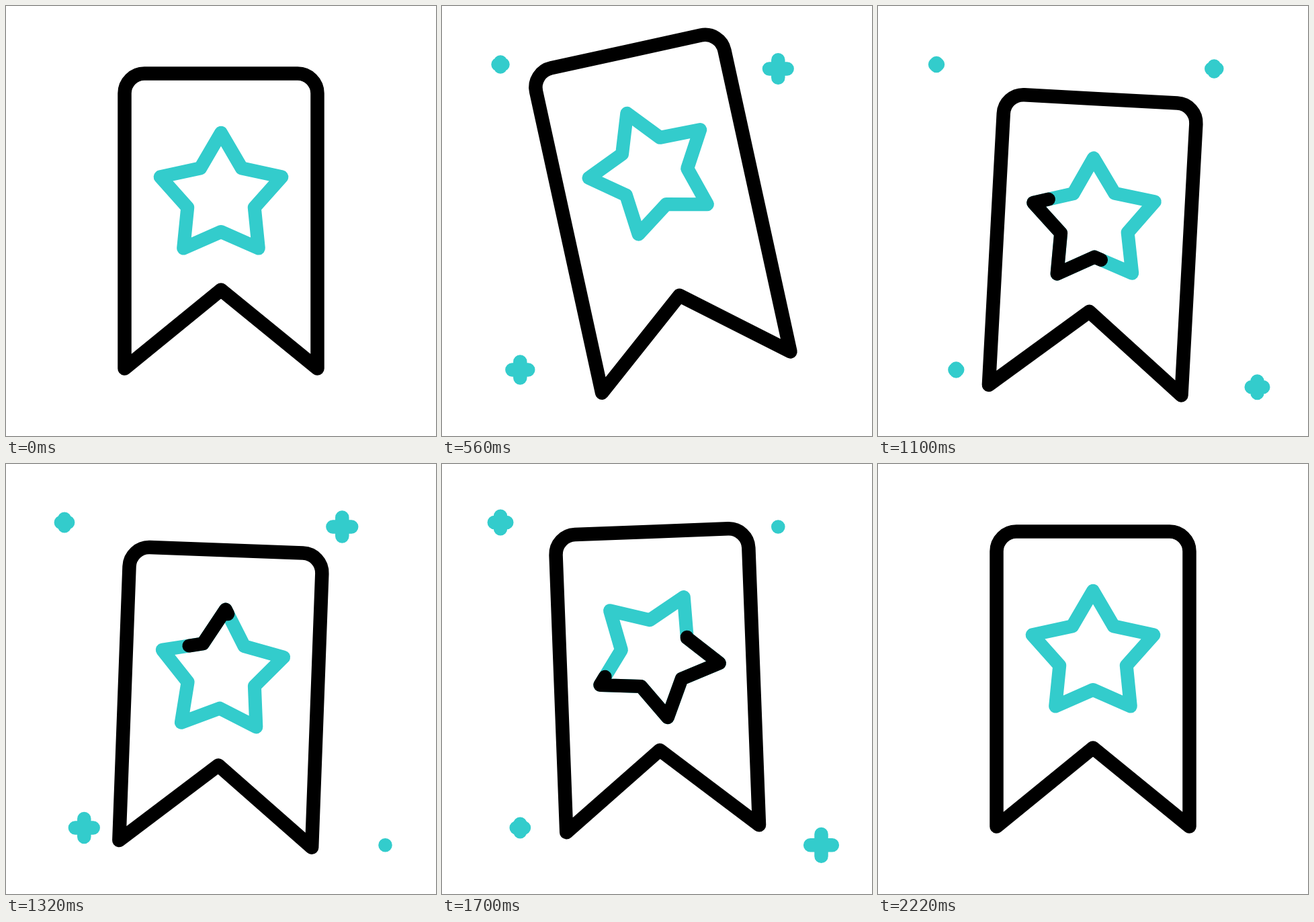
Animation of 640 by 640 pixels, one loop 2420 ms. Source, as an HTML page with a canvas:

```html
<!DOCTYPE html>
<html>
<head>
<meta charset="utf-8">
<title>Bookmark</title>
<style>
  html, body { margin: 0; width: 100%; height: 100%; overflow: hidden; background: #fff; }
  canvas { display: block; }
</style>
</head>
<body>
<canvas id="stage" width="640" height="640"></canvas>
<script>
const ctx = document.getElementById('stage').getContext('2d');
const LOOP = 2420, PULSE_GAP = 730, TEAL = '#33cccc', BLACK = '#000';
const CENTER = 320, PIVOT_Y = 316, STAR_Y = -36.3, OUTER = 95, INNER = 52.3;

const rad = deg => deg * Math.PI / 180;
const smooth = u => u * u * (3 - 2 * u);
const ease = (t, from, to) => smooth(Math.min(1, Math.max(0, (t - from) / (to - from))));

// The bookmark jumps up, leans and stretches, then drops and settles.
const lift = t => -38 * ease(t, 0, 600) + 76 * ease(t, 685, 1120) - 38 * ease(t, 1120, 1707);
const tilt = t => -14.8 * ease(t, 0, 757) + 19.8 * ease(t, 839, 1163) - 9.4 * ease(t, 1200, 1530) + 4.4 * ease(t, 1540, 1860);
const stretch = t => 50 * ease(t, 0, 600) - 56 * ease(t, 808, 1125) + 13 * ease(t, 1180, 1540) - 7 * ease(t, 1540, 1860);
const spin = t => -110 * ease(t, 436, 1070) - 250 * ease(t, 833, 1928);

// Both ends of the black stroke, in turns around the star.
const trimHead = t => 1.5 * ease(t, 568, 1294) + 1.5 * ease(t, 1195, 1947);
const trimTail = t => 1.7 * ease(t, 657, 1523) + 1.3 * ease(t, 1402, 2215);

const sparkles = [
  { x: 87, y: 87, arm: 15, peak: 815, half: 370 },
  { x: 500.3, y: 93.5, arm: 14, peak: 610, half: 370 },
  { x: 116.3, y: 541.5, arm: 16.5, peak: 710, half: 430 },
  { x: 564.5, y: 567.3, arm: 17, peak: 930, half: 350 }
];

const star = new Path2D();
for (let i = 0; i < 10; i++) {
  const r = i % 2 ? INNER : OUTER, a = rad(i * 36);
  star.lineTo(r * Math.sin(a), -r * Math.cos(a));
}
star.closePath();
const perimeter = 10 * Math.sqrt(OUTER ** 2 + INNER ** 2 - 2 * OUTER * INNER * Math.cos(rad(36)));

function drawBookmark(extra) {
  const w = 143.5, top = -219.5, bottom = 219.5 + extra, r = 29.5;
  ctx.beginPath();
  ctx.moveTo(0, top);
  ctx.arcTo(w, top, w, bottom, r);
  ctx.lineTo(w, bottom);
  ctx.lineTo(0, 102.5 + extra);
  ctx.lineTo(-w, bottom);
  ctx.arcTo(-w, top, 0, top, r);
  ctx.closePath();
  ctx.strokeStyle = BLACK;
  ctx.lineWidth = 20.5;
  ctx.stroke();
}

function drawStar(t) {
  ctx.lineWidth = 20;
  ctx.strokeStyle = TEAL;
  ctx.stroke(star);
  const tail = trimTail(t), length = (trimHead(t) - tail) * perimeter;
  if (length < 0.5) return;
  ctx.strokeStyle = BLACK;
  ctx.setLineDash([length, perimeter - length]);
  ctx.lineDashOffset = -(tail % 1) * perimeter;
  ctx.stroke(star);
  ctx.setLineDash([]);
}

// Each sparkle grows and shrinks twice.
function drawSparkle({ x, y, arm, peak, half }, t) {
  const distance = Math.min(Math.abs(t - peak), Math.abs(t - peak - PULSE_GAP));
  if (distance >= half) return;
  const a = Math.max(0.05, arm * smooth(1 - distance / half));
  ctx.beginPath();
  ctx.moveTo(x - a, y);
  ctx.lineTo(x + a, y);
  ctx.moveTo(x, y - a);
  ctx.lineTo(x, y + a);
  ctx.strokeStyle = TEAL;
  ctx.lineWidth = 20.5;
  ctx.stroke();
}

function draw(t) {
  ctx.fillStyle = '#fff';
  ctx.fillRect(0, 0, 640, 640);
  ctx.lineCap = ctx.lineJoin = 'round';
  sparkles.forEach(s => drawSparkle(s, t));
  ctx.save();
  ctx.translate(CENTER, PIVOT_Y + lift(t));
  ctx.rotate(rad(tilt(t)));
  ctx.translate(0, CENTER - PIVOT_Y);
  drawBookmark(stretch(t));
  ctx.translate(0, STAR_Y);
  ctx.rotate(rad(spin(t)));
  drawStar(t);
  ctx.restore();
}

const start = performance.now();
function tick() {
  draw((performance.now() - start) % LOOP);
  requestAnimationFrame(tick);
}
tick();
</script>
</body>
</html>
```
